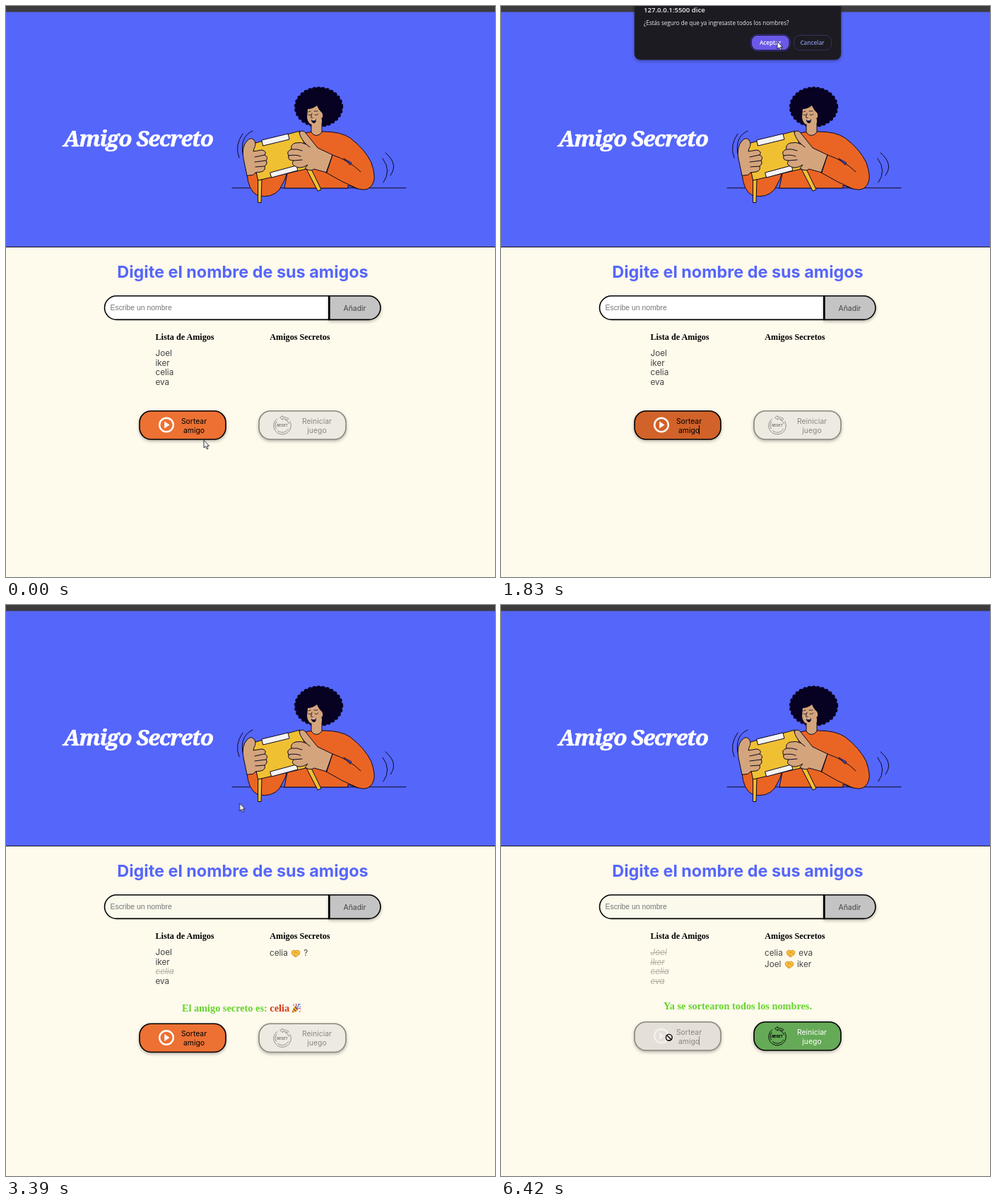
These frames come from a looping animation (692x809 px, 6620 ms). An HTML page:

```html
<!DOCTYPE html>
<html lang="es">
<head>
<meta charset="utf-8">
<title>Amigo Secreto</title>
<style>
html, body { margin: 0; width: 100%; height: 100%; overflow: hidden; background: #fefaec; }
#stage { position: absolute; left: 0; top: 0; width: 692px; height: 809px; overflow: hidden; }
#stage > svg { position: absolute; left: 0; top: 0; }
svg { display: block; }
.sans { font-family: Inter, sans-serif; }
.serif { font-family: "Liberation Serif", serif; font-weight: 700; }
.ui { font-family: "Open Sans", "Noto Sans", sans-serif; }
.mid { text-anchor: middle; }
.title { font: italic 700 31.2px "Noto Serif", serif; letter-spacing: -1.2px; fill: #fff; stroke: #fff; stroke-width: .6; }
.shadow { filter: drop-shadow(0 2px 2px rgba(0, 0, 0, .28)); }

/* every animation shares one clock */
.a { animation: 6620ms step-end infinite both; }
.ease { animation-timing-function: ease-in-out; }

.row { position: absolute; white-space: pre; color: #444; font: 11.7px/15.5px Inter, sans-serif; height: 15.5px; }
.row svg { display: inline-block; vertical-align: -2px; }
.row b { position: absolute; font-weight: 400; }
.name { position: absolute; left: 211.5px; color: #444; font: 11.7px/13.65px Inter, sans-serif; }
.msg { position: absolute; left: 0; top: 560.7px; width: 667px; text-align: center; white-space: pre;
  font: 700 14.3px/20px "Liberation Serif", serif; color: #67d42c; }
.msg span { color: #d63c16; }
.msg svg { display: inline-block; vertical-align: -3px; margin-left: 2px; }

/* names crossed out one by one */
@keyframes cross1 { 38.82%, 100% { color: #b5b0a7; font-style: italic; text-decoration-line: line-through; } }
@keyframes cross2 { 64.65%, 100% { color: #b5b0a7; font-style: italic; text-decoration-line: line-through; } }
@keyframes cross3 { 79.6%, 100% { color: #b5b0a7; font-style: italic; text-decoration-line: line-through; } }
@keyframes cross4 { 93.65%, 100% { color: #b5b0a7; font-style: italic; text-decoration-line: line-through; } }

/* stages of the draw */
@keyframes draw1 { 0% { opacity: 0; } 38.82% { opacity: 1; } 64.65%, 100% { opacity: 0; } }
@keyframes draw2 { 0% { opacity: 0; } 64.65% { opacity: 1; } 79.6%, 100% { opacity: 0; } }
@keyframes draw3 { 0% { opacity: 0; } 79.6% { opacity: 1; } 93.65%, 100% { opacity: 0; } }
@keyframes after1 { 0% { opacity: 0; } 38.82%, 100% { opacity: 1; } }
@keyframes after2 { 0% { opacity: 0; } 64.65%, 100% { opacity: 1; } }
@keyframes after3 { 0% { opacity: 0; } 79.6%, 100% { opacity: 1; } }
@keyframes after4 { 0% { opacity: 0; } 93.65%, 100% { opacity: 1; } }

@keyframes locked { 0% { fill: #fff; } 38.82%, 100% { fill: #fbf9ec; } }
@keyframes drop { 0% { transform: none; } 38.82% { transform: translateY(19.5px); } 93.65%, 100% { transform: translateY(17px); } }
@keyframes drawFill {
  0% { fill: #ec7133; } 2.11% { fill: #d16229; } 38.82% { fill: #ec7133; }
  57.4% { fill: #d16229; } 93.65%, 100% { fill: #e4e0d9; }
}
@keyframes drawInk { 0% { color: #000; } 93.65%, 100% { color: #8a877f; } }
@keyframes playInk { 0% { color: #fff; } 93.65%, 100% { color: #f3f0e9; } }
@keyframes resetFill { 0% { fill: #edeae2; } 93.65%, 100% { fill: #65aa56; } }
@keyframes resetInk { 0% { color: #8a877f; } 93.65%, 100% { color: #000; } }
@keyframes resetText { 0% { fill: #8a877f; } 93.65%, 100% { fill: #fff; } }
@keyframes caret {
  0% { opacity: 0; } 8.45% { opacity: 1; } 46.97% { opacity: 0; } 54.98% { opacity: 1; }
  71.6% { opacity: 0; } 79.6% { opacity: 1; } 87.61% { opacity: 0; } 95.61%, 100% { opacity: 1; }
}

@keyframes dialog {
  0%, 8.45% { opacity: 0; transform: translateY(-10px); }
  11.02%, 38.82% { opacity: 1; transform: none; }
  40.93%, 41.95% { opacity: .27; transform: translateY(-9.5px); }
  41.99%, 100% { opacity: 0; transform: translateY(-10px); }
}
@keyframes accept { 0% { fill: #4632e0; } 25.2% { fill: #6a58e8; } 35.64%, 100% { fill: #7566ea; } }

@keyframes travel {
  0%, 1.05% { transform: translate(280px, 615px); }
  5.8%, 16% { transform: translate(268px, 594px); }
  25.53% { transform: translate(391px, 54px); }
  27.64%, 46.9% { transform: translate(391px, 50px); }
  56.34% { transform: translate(250px, 589px); }
  60.57%, 100% { transform: translate(238px, 613px); }
}
@keyframes arrow { 0% { opacity: 1; } 2.11% { opacity: 0; } 17.07% { opacity: 1; } 57.4%, 100% { opacity: 0; } }
@keyframes hand { 0% { opacity: 0; } 2.11% { opacity: 1; } 17.07% { opacity: 0; } 57.4% { opacity: 1; } 94.71%, 100% { opacity: 0; } }
@keyframes stop { 0% { opacity: 0; } 94.71%, 100% { opacity: 1; } }
@keyframes click {
  0% { opacity: 0; } 6.49% { opacity: 1; } 9.06% { opacity: 0; }
  35.64% { opacity: 1; } 38.82% { opacity: 0; } 62.68% { opacity: 1; } 64.65% { opacity: 0; }
  76.58% { opacity: 1; } 79.6% { opacity: 0; } 90.63% { opacity: 1; } 93.65%, 100% { opacity: 0; }
}
</style>
</head>
<body>
<div id="stage">
<svg width="692" height="809" viewBox="0 0 692 809">
  <defs>
    <g id="shake" stroke="#b9741c" stroke-width=".6" stroke-linejoin="round">
      <path d="M2 3.4 5 .8 8 2 11 .8 14 3.4 13.2 7 8.6 10.6 6.6 10.4 2.8 7Z" fill="#fbc23c"/>
      <path d="M8 2 5.8 4.4Q7 5.6 9 4L12.6 7.2" fill="none"/>
      <path d="M4.4 8 6 6.4M6 9.4 7.6 7.6M8.8 9.8 7.8 8.6" fill="none"/>
      <path d="M1.8 3.6 4 1.4M12 1.4 14.2 3.6" stroke="#f09a26"/>
    </g>
    <g id="party">
      <path d="M1 14 5 4.6 10.4 10.2Z" fill="#f2b632"/>
      <path d="M2.4 10.8 5 13.2 3.4 13.2 1.8 12ZM4 7 8.4 11.4 6.6 12.2 3.2 9Z" fill="#a0612c"/>
      <path d="M5 4.6Q9 5 10.4 10.2Q6.8 8.8 5 4.6Z" fill="#6b4a6e"/>
      <path d="M7 5Q9 3 7 .8M9.4 8.4Q12 6 14.2 8.6" fill="none" stroke="#c8457a" stroke-width="1.2"/>
      <path d="M8.6 6.6Q10.4 5.4 10.8 3.4T13.6 1.4" fill="none" stroke="#3f8ac4" stroke-width="1.2"/>
      <path d="M3.2 1.8h1.6v1.6H3.2ZM12 11h1.5v1.5H12Z" fill="#e04c35"/>
      <path d="M10 1h1.3v1.3H10ZM12.6 4.6h1.4v1.4h-1.4Z" fill="#8a5cc0"/>
    </g>
  </defs>

  <rect width="692" height="809" fill="#fefaec"/>
  <rect y="8" width="692" height="333" fill="#5566fb"/>
  <rect width="692" height="8.5" fill="#3c3b3d"/>
  <rect y="341" width="692" height="1" fill="#15151f"/>
  <text x="187" y="198.7" class="title mid">Amigo Secreto</text>

  <!-- woman shaking the box -->
  <g stroke="#0c0820" stroke-width="1" stroke-linejoin="round" stroke-linecap="round">
    <path d="M320 257.8H566"/>
    <path d="M341 238Q343 262 356 268.5 376 273 387 260 396 246 399 232Z" fill="#ea6524"/>
    <path d="M394 257.8Q398 236 404 210L420 181Q432 177 450 178 474 178 487 187 508 203 517 222 523 240 520.5 248 517 260 506 260.3 496 260 484 254L484 257.8Z" fill="#ea6524"/>
    <path d="M478 216 489 222 487 225Z" fill="#5566fb" stroke-width=".8"/>
    <path d="M462 211Q486 219 502 235M453 236Q476 250 498 259" fill="none"/>
    <g fill="#070122" stroke="#070122">
      <ellipse cx="442.5" cy="143" rx="32" ry="26.5"/>
      <ellipse cx="442.5" cy="143.2" rx="31.4" ry="25.6" fill="none" stroke-width="6.6" stroke-dasharray="0 6.1"/>
    </g>
    <path d="M427 146Q434 146 440 141 443 148 447 151 450 156 446 160 445 169 436 169 427 168 426 158Z" fill="#d4a57c" stroke="none"/>
    <path d="M432 164V179Q439 188 447 179L447 160Z" fill="#d4a57c" stroke="none"/>
    <path d="M432 168V179Q439 188 447 179V166" fill="none"/>
    <path d="M428 150 431 149M436 149 441 149M428 154Q430 156 432 154M437 154Q440 156 442 153M433 152 431.5 158 434 158.5" fill="none" stroke-width=".8"/>
    <path d="M432 161Q436 163 439 160 439 166 435.5 166 432 165 432 161Z" fill="#070122" stroke="none"/>
    <path d="M433.5 161.8 437.8 161.6" stroke="#fff" stroke-width=".8"/>

    <path d="M357 246H362L361 278.5H357ZM426 232 431 229 446 260 441.5 262Z" fill="#f0c033"/>
    <path d="M346 196 416 177 433 229 357 247Z" fill="#f0c033"/>
    <path d="M362 190 399 181 401 189 364 198ZM374 236 411 226 413 233 376 243Z" fill="#f6f4f3"/>
    <path d="M341 240 336 216Q333 200 341 191 347 185 351 190 355 195 351 202L350 206 362 204Q370 206 366 211 372 214 368 219 371 223 366 227 368 233 361 235L353 236 350 239Z" fill="#d4a57c"/>
    <path d="M366 211 352 214M368 219 352 221M366 227 353 228" fill="none"/>
    <path d="M415 179Q420 174 425 181 433 191 441 201L462 211 454 236 436 231Q431 235 423 230L427 225Q416 232 409 227 403 224 407 219 398 219 400 212 396 206 404 203 402 196 410 194 418 192 425 196 416 187 415 179Z" fill="#d4a57c"/>
    <path d="M404 203Q412 202 419 205M400 212Q410 210 417 213M407 219 419 218M425 196 430 200" fill="none"/>
    <path d="M462 211 453 236" fill="none"/>
    <path d="M349 177Q331 185 335 209M335 181Q323 198 330 215M537 208Q556 224 544 240M533 216Q546 233 534 250" fill="none"/>
  </g>

  <text x="335" y="385" class="sans mid" font-size="23.4" font-weight="700" fill="#5566fb">Digite el nombre de sus amigos</text>

  <path class="a" style="animation-name:locked" d="M457 410.8H156.3A16.8 16.8 0 0 0 156.3 444.4H457Z" fill="#fff" stroke="#000" stroke-width="1.6"/>
  <path class="shadow" d="M457.6 410.8H513.2A16.8 16.8 0 0 1 513.2 444.4H457.6Z" fill="#c4c4c4" stroke="#000" stroke-width="1.6"/>
  <path d="M457.2 410V445.2" stroke="#000" stroke-width="2.6"/>
  <text x="147.5" y="431" font-family="'Liberation Sans',sans-serif" font-size="10.4" fill="#757575">Escribe un nombre</text>
  <text x="493.5" y="431.5" class="sans mid" font-size="10.4" fill="#444">Añadir</text>

  <g class="serif" font-size="12.17" fill="#000">
    <text x="211.5" y="472.5">Lista de Amigos</text>
    <text x="373.3" y="472.5">Amigos Secretos</text>
  </g>

  <g class="a" style="animation-name:drop">
    <g class="a" style="animation-name:drawInk">
      <rect class="a shadow" style="animation-name:drawFill" x="189" y="573.8" width="122" height="40.2" rx="16.4" stroke="currentColor" stroke-width="1.6"/>
      <g class="a" style="animation-name:playInk">
        <circle cx="227" cy="593.5" r="9.8" fill="none" stroke="currentColor" stroke-width="2.4"/>
        <path d="M224.2 588.4 231.6 593.5 224.2 598.6Z" fill="currentColor"/>
      </g>
      <g class="sans mid" font-size="10.4" fill="currentColor">
        <text x="266" y="591.5">Sortear</text>
        <text x="266" y="604.7">amigo</text>
      </g>
      <rect class="a" style="animation-name:caret" x="280" y="594" width="1" height="13" fill="currentColor"/>
    </g>
    <g class="a" style="animation-name:resetInk">
      <rect class="a shadow" style="animation-name:resetFill" x="358" y="573.8" width="123" height="40.2" rx="16.4" stroke="currentColor" stroke-width="1.6"/>
      <g fill="none" stroke="currentColor" stroke-width=".9">
        <path d="M384 584.6A12.3 12.3 0 1 0 401.5 588.2"/>
        <path d="M383.2 588.4A9.9 9.9 0 0 0 382.5 599.2M384.2 601.4A9.9 9.9 0 0 0 399.8 598.8M400.6 592.2A9.9 9.9 0 0 0 394.6 585.8"/>
        <path d="M391.5 580.5 387.5 583.2 391.5 586.2V584.5Q396 584.5 398.5 586.5L400 584.6Q396 582 391.5 582.2Z" stroke-width=".8"/>
      </g>
      <text x="391" y="596" class="sans mid" font-size="4.9" font-weight="800" fill="currentColor">RESET</text>
      <g class="a sans mid" style="animation-name:resetText" font-size="10.4">
        <text x="440" y="591.5">Reiniciar</text>
        <text x="440" y="604.7">juego</text>
      </g>
    </g>
  </g>
</svg>

<div class="name a" style="top:485.9px;animation-name:cross3">Joel</div>
<div class="name a" style="top:499.55px;animation-name:cross4">iker</div>
<div class="name a" style="top:513.2px;animation-name:cross1">celia</div>
<div class="name a" style="top:526.85px;animation-name:cross2">eva</div>

<div class="row a" style="left:373px;top:486.4px;animation-name:after1">celia <svg width="16" height="11"><use href="#shake"/></svg> <b class="a" style="animation-name:draw1">?</b><b class="a" style="animation-name:after2">eva</b></div>
<div class="row a" style="left:373px;top:501.9px;animation-name:after3">Joel <svg width="16" height="11"><use href="#shake"/></svg> <b class="a" style="animation-name:draw3">?</b><b class="a" style="animation-name:after4">iker</b></div>

<div class="msg a" style="animation-name:draw1">El amigo secreto es: <span>celia</span><svg width="15" height="15"><use href="#party"/></svg></div>
<div class="msg a" style="animation-name:draw2">El amigo secreto es: <span>eva</span><svg width="15" height="15"><use href="#party"/></svg></div>
<div class="msg a" style="animation-name:draw3">El amigo secreto es: <span>Joel</span><svg width="15" height="15"><use href="#party"/></svg></div>
<div class="msg a" style="top:558.2px;width:670px;animation-name:after4">Ya se sortearon todos los nombres.</div>

<svg width="692" height="809" viewBox="0 0 692 809">
  <g class="a ui" style="animation-name:dialog;animation-timing-function:linear">
    <rect class="shadow" x="189" y="-40" width="292" height="116" rx="8" fill="#1c1b21" stroke="#2a2930" stroke-width=".8"/>
    <text x="202" y="8.5" font-size="9.6" font-weight="600" fill="#f0eff4">127.0.0.1:5500 dice</text>
    <text x="202" y="27" font-size="8.05" fill="#eceaf1">¿Estás seguro de que ya ingresaste todos los nombres?</text>
    <rect x="353.5" y="40.5" width="55.5" height="23" rx="9" fill="none" stroke="#35309a"/>
    <rect class="a" style="animation-name:accept" x="355" y="42" width="52.5" height="20" rx="7.5"/>
    <rect x="414.5" y="41.5" width="53" height="21" rx="8" fill="none" stroke="#34325f"/>
    <g class="mid" font-size="8.15" font-weight="600">
      <text x="381.2" y="55" fill="#fff">Aceptar</text>
      <text x="440.5" y="55" fill="#8791e0">Cancelar</text>
    </g>
  </g>

  <g class="a ease" style="animation-name:travel">
    <circle class="a" style="animation-name:click" r="8" fill="#f2c200" fill-opacity=".62"/>
    <g fill="#fff" stroke="#000" stroke-width=".8" stroke-linejoin="round">
      <path class="a" style="animation-name:arrow" d="M0 .4V11L2.5 8.8 4.3 12.8 6 12 4.3 8.2H7.6Z"/>
      <path class="a" style="animation-name:hand" d="M-1.1 1Q0-.4 1.1 1V5.4Q2.3 4.6 3.3 5.8 4.5 5.1 5.3 6.3 6.6 5.8 7 7.2V10.6Q6.4 12.6 5.6 14.6H-.2L-3.6 9.8Q-4.2 7.8-2.4 8.2L-1.1 9.2Z"/>
    </g>
    <g class="a" style="animation-name:stop" fill="none">
      <path d="M-3.4-3.6 3.2 3" stroke="#fff" stroke-width="3"/>
      <circle cx="-.2" cy="-.3" r="4.4" stroke="#fff" stroke-width="2.8"/>
      <circle cx="-.2" cy="-.3" r="4.4" stroke="#1c0d0a" stroke-width="1.6"/>
      <path d="M-3.4-3.5 3 2.9" stroke="#1c0d0a" stroke-width="1.6"/>
    </g>
  </g>
</svg>
</div>
</body>
</html>
```
